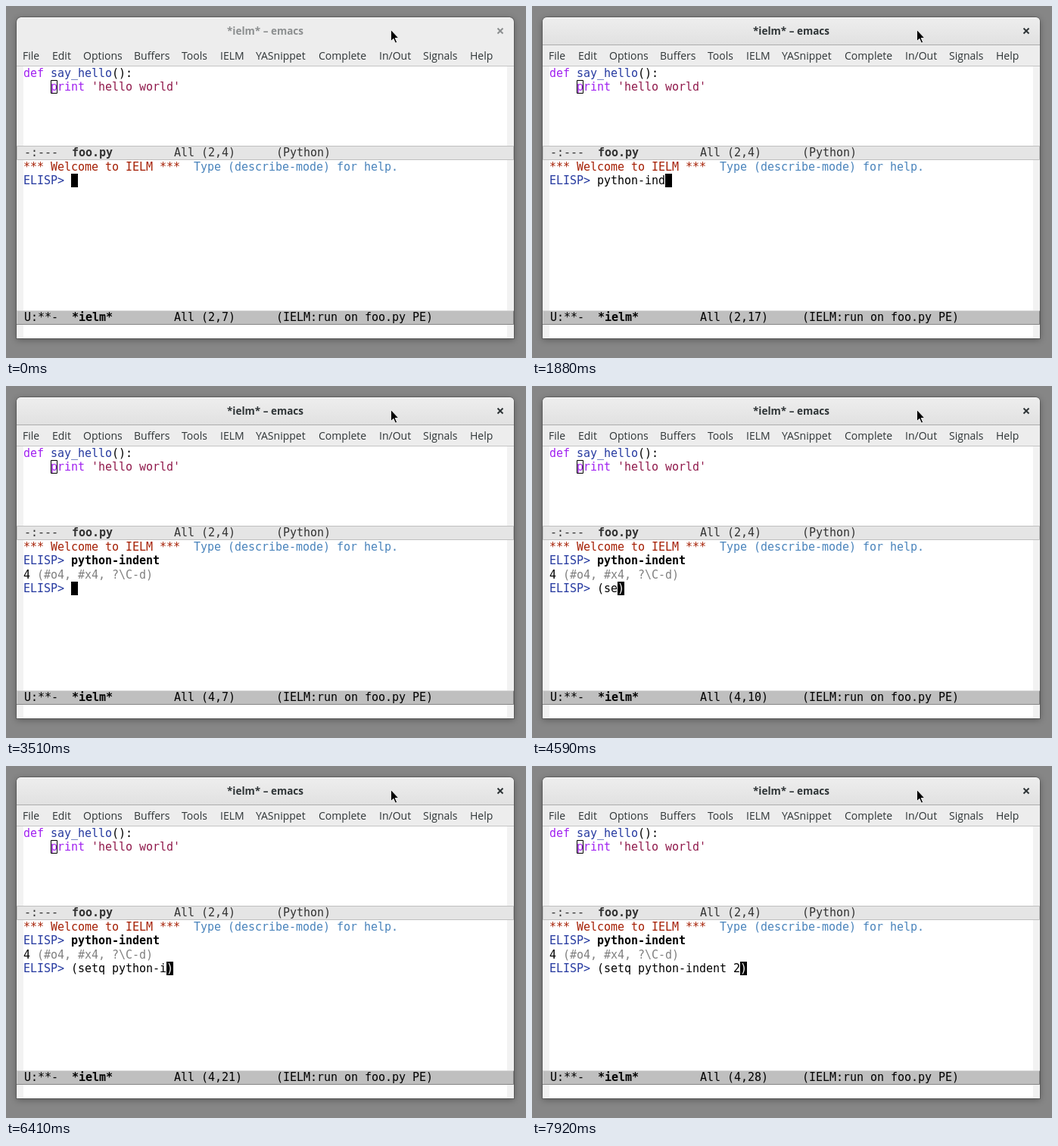
Recreate the animation shown at these times as an HTML page. Size 687 by 466 pixels, loop 8 s.

```html
<!DOCTYPE html>
<html lang="en">
<head>
<meta charset="utf-8">
<title>IELM session</title>
<style>
  html, body { margin: 0; width: 100%; height: 100%; overflow: hidden; background: #868686; }
  .window {
    position: absolute; left: 14px; top: 15px; width: 657px; height: 425px;
    border-radius: 6px 6px 0 0; background: #ededed;
    box-shadow: 0 0 0 1px rgba(0,0,0,.22), 0 2px 8px rgba(0,0,0,.35);
  }
  svg { position: absolute; left: 0; top: 0; }
  .mono { font: 15px "DejaVu Sans Mono", monospace; }
  .ui { font: 14px "Open Sans", "Noto Sans", sans-serif; fill: #2e3436; }
  .title { font-weight: 700; font-size: 13.5px; text-anchor: middle; }
  .bold { font-weight: 700; }
</style>
</head>
<body>
<div class="window"></div>
<svg width="687" height="466" xml:space="preserve">
  <defs>
    <linearGradient id="bar" x2="0" y2="1">
      <stop stop-color="#eeeeee"/><stop offset="1" stop-color="#e1e1e1"/>
    </linearGradient>
  </defs>
  <g id="focused">
    <path d="M14 51V21q0-6 6-6H665q6 0 6 6V51z" fill="url(#bar)"/>
    <path d="M14 51.5H671" stroke="#acacac"/>
  </g>
  <path d="M19 15.5H666" stroke="#fafafa"/>
  <g id="heading">
    <text class="ui title" x="342.5" y="38" style="fill:currentColor">*ielm* – emacs</text>
    <path d="M649.5 29.5l7 7m0-7l-7 7" stroke="currentColor" stroke-width="2"/>
  </g>
  <g id="menu" class="ui"></g>
  <path d="M14 79.5H671" stroke="#c4c4c4"/>
  <path d="M14 80H671V440H14z" fill="#f2f2f2"/>
  <path d="M23 80H662V440H23z" fill="#fff"/>
  <path d="M14.5 185.5H670.5V203.5H14.5z" fill="#e5e5e5" stroke="#bfbfbf"/>
  <path d="M14 403H671V422H14z" fill="#bfbfbf"/>
  <path d="M14.5 421V403.5H670" fill="none" stroke="#d6d6d6"/>
  <path d="M14 421.5H670.5V404" fill="none" stroke="#858585"/>
  <g id="screen" class="mono"></g>
  <path d="M59.5 98.5h8v17h-8z" fill="none" stroke="#000"/>
  <rect id="cursor" width="9" height="18"/>
  <g id="over" class="mono"></g>
  <path d="M508.5 31.5v15l3.4-3.2 2.5 5.6 2.2-1-2.5-5.4h4.6z" fill="#000" stroke="#fff" stroke-width=".8"/>
</svg>
<script>
const LOOP = 8000, CELL = 9, LEFT = 23, INPUT = 86;
const ENTER = 2530;
const el = id => document.getElementById(id);
const NS = 'http://www.w3.org/2000/svg';

// Text on the terminal grid, one x per character
function setText(node, s) {
  if (node.textContent === s) return;
  node.setAttribute('x', Array.from(s, (_, i) => node.left + i * CELL).join(' '));
  node.textContent = s;
}
function put(s, x, y, fill = '#000', cls = '', parent = 'screen') {
  const node = document.createElementNS(NS, 'text');
  node.left = x;
  node.setAttribute('y', y);
  node.setAttribute('fill', fill);
  node.setAttribute('class', cls);
  setText(node, s);
  return el(parent).appendChild(node);
}

const menu = { File: 22, Edit: 61, Options: 102, Buffers: 169, Tools: 232, IELM: 283,
  YASnippet: 330, Complete: 413, 'In/Out': 493, Signals: 551, Help: 613 };
el('menu').innerHTML = Object.entries(menu)
  .map(([name, x]) => `<text x="${x}" y="71">${name}</text>`).join('');

const purple = '#a020f0', blue = '#263aa0', grey = '#7f7f7f', dim = '#333';
put('def', LEFT, 94, purple);
put('say_hello', 59, 94, blue);
put('():', 140, 94);
put('print', 59, 112, purple);
put("'hello world'", 113, 112, '#901a4c');

put('-:---', 24, 199, dim);
put('foo.py', 87, 199, dim, 'bold');
put('All (2,4)', 222, 199, dim);
put('(Python)', 357, 199, dim);

put('*** Welcome to IELM ***', LEFT, 218, '#a52005');
put('Type (describe-mode) for help.', 248, 218, '#4a84bc');
put('ELISP>', LEFT, 236, blue);
const first = put('', INPUT, 236);
const reply = [
  put('4', LEFT, 255),
  put('(#o4, #x4, ?\\C-d)', 41, 255, grey),
  put('ELISP>', LEFT, 273, blue)
];
const second = put('', INPUT, 273);

put('U:**-', 24, 417);
put('*ielm*', 87, 417, '#000', 'bold');
const position = put('', 222, 417);
put('(IELM:run on foo.py PE)', 357, 417);
const paren = put('', INPUT, 273, '#fff', '', 'over');

// Key press times for each input line
const lines = [
  { text: 'python-indent', keys: [420, 560, 690, 820, 960, 1090,
    1450, 1590, 1730, 1880, 2020, 2140, 2260] },
  { text: '(setq python-indent 2', keys: [4210, 4480, 4590, 4700, 4850, 5000, 5150, 5300, 5450,
    5590, 5740, 5900, 6110, 6410, 6490, 6690, 6860, 7040, 7210, 7590, 7920] }
];
const typed = (line, t) => line.text.slice(0, line.keys.filter(k => k <= t).length);

function draw(t) {
  const active = t >= 70, entered = t >= ENTER;
  el('focused').style.display = active ? '' : 'none';
  el('heading').style.color = active ? '#2e3436' : '#8b8e8f';

  const a = typed(lines[0], t), b = typed(lines[1], t);
  const col = (entered ? b : a).length;
  setText(first, a);
  first.setAttribute('class', entered ? 'bold' : '');
  for (const node of reply) node.style.display = entered ? '' : 'none';
  setText(second, b);
  setText(position, `All (${entered ? 4 : 2},${col + 7})`);

  const x = INPUT + col * CELL;
  const blinkOff = t >= 3020 && t < 3510 || t >= 4000 && t < 4210;
  el('cursor').setAttribute('x', x);
  el('cursor').setAttribute('y', entered ? 259 : 222);
  el('cursor').style.display = blinkOff ? 'none' : '';

  // The closing bracket is paired automatically and sits under the cursor
  setText(paren, b ? ')' : '');
  paren.setAttribute('x', x);
}

const start = performance.now();
function tick() {
  draw((performance.now() - start) % LOOP);
  requestAnimationFrame(tick);
}
tick();
</script>
</body>
</html>
```
